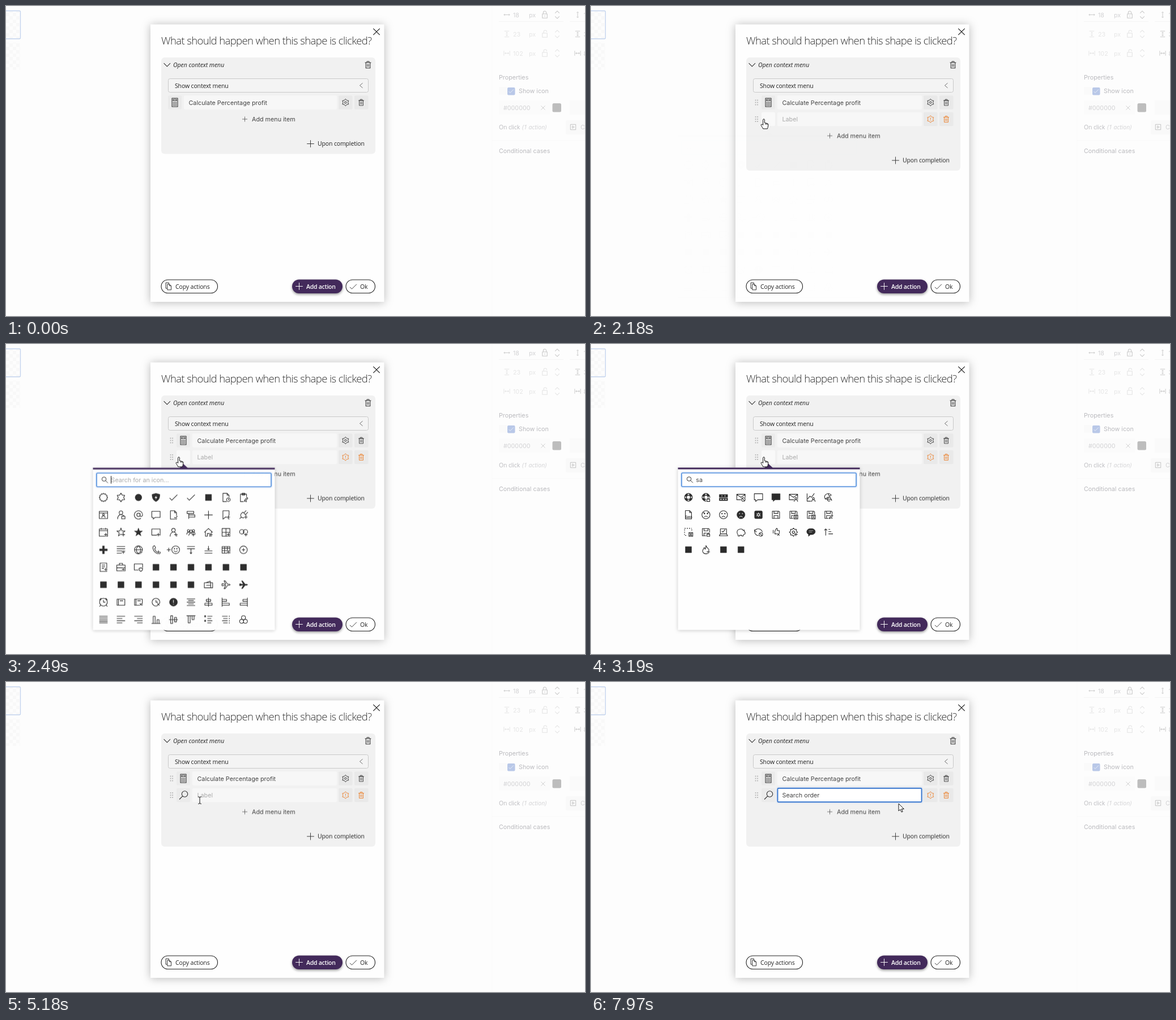
An HTML page that plays this animation: 1022 by 548 pixels, repeating every 8 s.

```html
<!DOCTYPE html>
<html lang="en">
<head>
<meta charset="utf-8">
<title>Context menu editor</title>
<style>
html, body { margin: 0; width: 100%; height: 100%; overflow: hidden; background: #fdfdfd; }
svg { display: block; }
text { font: 10.75px Inter, sans-serif; fill: #444; white-space: pre; }
.ui { font: 10.5px "Open Sans", sans-serif; letter-spacing: -.14px; fill: #222; }
.title { font: 300 18.5px "Open Sans", sans-serif; letter-spacing: -.61px; fill: #2c2c2c; }
.it { font-style: italic; letter-spacing: 0; }
.bold { font-weight: 600; letter-spacing: -.25px; fill: #fff; }
.hint { fill: #aaa; }
.dim { fill: #bababe; }
.pale { fill: #d2d2d4; }
.paler { fill: #e6e6e6; }
.sass { font-size: 5.5px; font-weight: 600; fill: #222; }
.i { fill: none; stroke: currentColor; stroke-width: 1.1; stroke-linejoin: round; }
.solid { fill: currentColor; fill-rule: evenodd; stroke-width: .6; }
.halo { fill: #fff; stroke: #fff; stroke-width: 2.8; }
.modal { filter: drop-shadow(0 1px 8px rgba(0, 0, 0, .27)); }
.raised { filter: drop-shadow(0 2px 2px rgba(0, 0, 0, .4)); }
.pop { filter: drop-shadow(0 1px 3px rgba(0, 0, 0, .2)); }
.focus { fill: #fff; stroke: #2f70cc; stroke-width: 1.7; filter: drop-shadow(0 0 1.5px rgba(60, 130, 230, .5)); }
.search { stroke: #5a94de; }
</style>
</head>
<body>
<svg id="stage" width="1022" height="548" viewBox="0 0 1022 548"></svg>
<script>
const LOOP = 8000, BLINK = 530, PURPLE = '#432a5b', ORANGE = '#ec8433';

// Timeline helpers
let css = '', count = 0;
function anim(stops, ease = 'linear') {
  const name = 'k' + count++;
  const keys = stops.map(([t, rule]) => `${t / LOOP * 100}%{${rule}}`).join('');
  css += `@keyframes ${name}{${keys}}`;
  return `style="animation:${name} ${LOOP}ms ${ease} infinite"`;
}
const show = (body, ...spans) => {
  const stops = spans.flatMap(([a, b]) => [[a, 'opacity:1'], [b, 'opacity:0']]);
  return `<g ${anim([[0, 'opacity:0'], ...stops], 'step-end')}>${body}</g>`;
};

// Drawing helpers
const text = (x, y, s, cls = '') => `<text x="${x}" y="${y}" class="${cls}">${s}</text>`;
const rect = (x, y, w, h, fill, r = 0, extra = '') =>
  `<rect x="${x}" y="${y}" width="${w}" height="${h}" rx="${r}" fill="${fill}" ${extra}/>`;
const ring = (x, y, r) => `M${x - r} ${y}a${r} ${r} 0 1 0 ${2 * r} 0a${r} ${r} 0 1 0 ${-2 * r} 0z`;
const box = (x, y, w, h) => `M${x} ${y}h${w}v${h}h${-w}z`;
const star = (n, R, r) => 'M' + Array.from({length: 2 * n}, (_, i) => {
  const a = i * Math.PI / n, q = i % 2 ? r : R;
  return (q * Math.sin(a)).toFixed(1) + ' ' + (-q * Math.cos(a)).toFixed(1);
}).join('L') + 'z';

const person = ring(0, -4, 3.2) + 'M-6 7.5c0-11 12-11 12 0';
const doc = 'M-5.5-7.5H2L5.5-4V7.5h-11zM2-7.5V-4h3.5';
const disk = 'M-6.5-6.5H5L6.5-5V6.5h-13zM-3.5-6.5v4h7v-4M-3.5 6.5V1.5h7v5';
const bubble = 'M-7.5-6.5h15v11h-9l-3.5 3v-3h-2.5z';
const face = ring(0, 0, 7.3) + ring(-2.6, -2, .6) + ring(2.6, -2, .6);
const clock = ring(0, 0, 7) + 'M0-4V0h3.5';
const cog = star(6, 7.2, 5);

const GLYPHS = {
  burst: star(12, 7.6, 6.2), hex: star(6, 7.8, 4.8), star: star(5, 7.8, 3.2), dot: ring(0, 0, 6), sq: box(-5.5, -5.5, 11, 11),
  shield: 'M0-7.5l7 2c0 7-2 10.5-7 13-5-2.5-7-6-7-13zM1-4l-4 5h2.5L-1 4.5 3-1H.5z',
  check: 'M-7 1l4 4L7-5', doc, clip: box(-5.5, -6, 11, 13.5) + box(-2.5, -7.5, 5, 3), person, bubble, disk, clock,
  book: box(-7, -5.5, 14, 11) + 'M-4.5-5.5v11M-2-2.5h6', folder: 'M-7.5-6h5l1.5 2h8.5v10h-15z',
  plane: 'M-7.5-1.2L-6-2l3 1h2.5L-3.5-7h2L3-1h3q3 1 0 2H3l-4.5 6h-2L-.5 1H-3l-3 1-1.5-.8.8-1.2z',
  card: box(-7.5, -6.5, 15, 13) + 'M-7.5-3.5h15' + ring(0, -.5, 1.6) + 'M-3 5c0-4.5 6-4.5 6 0',
  at: ring(0, 0, 3) + 'M3-3v4c0 3 4.5 2 4.5-1a7.5 7.5 0 1 0-3 6', sign: box(-7, -6.5, 12, 4) + box(-4, 0, 11, 4) + 'M-4-2.5V7',
  plus: 'M-7.5 0h15M0-7.5v15', mark: 'M-5.5-7.5h11v15L0 3.5l-5.5 4z',
  plug: 'M-7 7l3-3M1-4l4-4M4-1l4-4M-4 4c-3-4 0-7 3-9l6 6c-2 3-5 6-9 3z',
  cal: box(-7.5, -6, 15, 13) + 'M-7.5-3h15M-4-8v3M4-8v3', pane: box(-7.5, -6, 15, 11),
  group: ring(-4.5, -3, 2) + ring(4.5, -3, 2) + ring(0, -2, 2.2) + 'M-7.5 4c0-5 4-5 5-3M7.5 4c0-5-4-5-5-3M-4 6c0-6 8-6 8 0',
  home: 'M-7.5 0L0-7l7.5 7M-5.5-1.5V7h3.5V2h4v5h3.5v-8.5', grid: box(-7, -7, 14, 14) + 'M0-7V7M-7 0H7',
  link: ring(-3, -1, 4) + ring(3.5, -1, 4), bold: 'M-1.7-7h3.4v5.3H7v3.4H1.7V7h-3.4V1.7H-7v-3.4h5.3z',
  text: 'M-7.5-6h15M-7.5-2h15M-7.5 2h15M-7.5 6h9', globe: ring(0, 0, 7.2) + 'M-7 0H7M0-7c-5 4-5 10 0 14M0-7c5 4 5 10 0 14',
  phone: 'M-5-6.5l2.5-1 2 4-2 1.5C-1.5 1 0 3 2.5 4.5L4 2.5l4 2-1 2.5C-1 8-7 0-5-6.5z',
  smile: ring(4, 0, 7) + 'M.5 1.5q3.5 4 7 0' + ring(1.8, -2, .6) + ring(6.2, -2, .6) + 'M-12 0h7M-8.5-3.5v7',
  above: 'M-7-6H7M-7-2H7M0-2v9M-2 5l2 2 2-2', below: 'M-7 6H7M-7 2H7M0 0v-7M-2-2l2 2 2-2',
  table: box(-7, -6, 14, 12) + 'M-7-3H7M-7 1.5H7M-2.5-6V6M2.5-6V6', circ: ring(0, 0, 6.8) + 'M-3 0h6M0-3v6',
  page: box(-6, -7.5, 12, 15) + 'M-3-4h6M-3-1h6M-3 2h4', bag: box(-7.5, -4, 15, 10.5) + 'M-3-4v-3h6v3M-7.5 1h15',
  ticket: box(-7.5, -3.5, 15, 9) + 'M-5-3.5l8-3 1 3M-4 1h8M4-3.5v9', alarm: clock + 'M-7-4l3-3.5M7-4L4-7.5M-5 5l-2 3M5 5l2 3',
  alert: ring(0, 0, 7.2) + box(-.8, -4.5, 1.6, 6) + box(-.8, 3, 1.6, 1.6),
  mid: 'M-7.5-6h15M-5-3h10M-7.5 0h15M-5 3h10M-7.5 6h15', objC: 'M0-8V8' + box(-4, -5, 8, 3.5) + box(-6.5, 2, 13, 3.5),
  objL: 'M-7-8V8' + box(-7, -5, 8, 3.5) + box(-7, 2, 13, 3.5), objR: 'M7-8V8' + box(-1, -5, 8, 3.5) + box(-6, 2, 13, 3.5),
  full: 'M-7.5-6h15M-7.5-3h15M-7.5 0h15M-7.5 3h15M-7.5 6h15', left: 'M-7.5-6h15M-7.5-2h10M-7.5 2h15M-7.5 6h10',
  right: 'M-7.5-6h15M-2.5-2h10M-7.5 2h15M-2.5 6h10', bot: 'M-8 7H8' + box(-5, -6, 3.5, 13) + box(2, 0, 3.5, 7),
  cen: 'M-8 0H8' + box(-5, -7, 3.5, 14) + box(2, -4, 3.5, 8), top: 'M-8-7H8' + box(-5, -7, 3.5, 13) + box(2, -7, 3.5, 7),
  list: 'M-2-6H7M-2-2H5M-2 2H7M-2 6H5' + box(-7, -7, 2, 2) + box(-7, 1, 2, 2), listR: 'M-7-6H3M-5-2H3M-7 2H3M-5 6H3M6-7v2M6-3v2M6 1v2M6 5v2',
  coins: ring(0, -3.5, 3.6) + ring(-3.5, 3, 3.6) + ring(3.5, 3, 3.6),
  buoy: ring(0, 0, 7.3) + ring(0, 0, 3.3) + box(-1.8, -6.5, 3.6, 2.4) + box(-1.8, 4.1, 3.6, 2.4) + box(-6.5, -1.8, 2.4, 3.6) + box(4.1, -1.8, 2.4, 3.6),
  gift: box(-7.5, -5, 15, 5) + box(-7.5, 1.3, 15, 4.7) + box(-3.5, -4, 1.5, 3) + box(2, -4, 1.5, 3) + box(-6, 2.5, 3, 2.3) + box(-1.5, 2.5, 3, 2.3) + box(3, 2.5, 3, 2.3),
  mail: box(-7.5, -5.5, 15, 10) + 'M-7.5-5L0 0l7.5-5', chart: 'M-7-7V7H7M-6 3l4-5 3 2 5-7', chute: 'M-6 3C-10-5 0-10 5-4L-6 3l12 1M-1-7L6 6M2 1a3 3 0 1 0 1 5',
  glum: face + 'M-3 4q3-3 6 0M-5-4l3 1M5-4L2-3', sad: face + 'M-3 4.5q3-4 6 0',
  frown: ring(0, 0, 7.3) + ring(-2.6, -2, 1.1) + ring(2.6, -2, 1.1) + 'M-3.5 4.5q3.5-5 7 0l-1 .5q-2.5-3-5 0z',
  flower: 'M-5-7H5q2 0 2 2V5q0 2-2 2H-5q-2 0-2-2V-5q0-2 2-2z' + star(6, 5.2, 2.4) + ring(0, 0, 1.2),
  dash: 'M-7-7h2M-3-7h2M1-7h2M5-7h1M-7-5v2M-7-1v2M-7 3v2M-6 6h2M6-5v2', laptop: box(-5.5, -6, 11, 9) + 'M-7.5 6.5h15L5.5 3h-11zM-3-2l2 2 4-5',
  pig: 'M-7 0c0-7 10-7 11-3l2-1v3l1.5 1v3L5 4l-1 3H1.5V5.5h-4V7H-5L-5.5 4C-7 3-7 2-7 0z', sync: 'M-7-5v4h4M-7-1C-5-8 5-8 7 0M7 5V1H3M7 1C5 8-5 8-7 0',
  thumb: 'M-5-4V2M-2 3V-2L1-7c3 0 1 4 1 4h4v6z', cog: star(8, 7.4, 5.4) + ring(0, 0, 2.2), gear: cog + ring(0, 0, 2),
  chat: 'M-1-6.5h2c9 0 9 11 0 11H-1l-3.5 3v-3.7c-5.5-2.6-3.5-10.3 3.5-10.3z' + box(-4, -3.4, 8, 1.1) + box(-4, -.8, 6, 1.1),
  sort: 'M-5 6V-6M-7.5-3.5L-5-6l2.5 2.5M0-5h3M0-1h5M0 3h8', flame: 'M0-7.5c1 5 6 5 6 10a6 5 0 0 1-12 0c0-3 2-3 2.5-6 2 0 2 2 2 3 1-2 2-4 1.5-7z',
  cloud: 'M-4 4a3.5 3.5 0 0 1-.5-7C-3-8 4-7 4.5-3c4 0 4 7 0 7z', branch: ring(-4.5, -5, 2) + ring(-4.5, 5, 2) + ring(4, -3, 2) + 'M-4.5-3v6M-4.5 2Q3 2 4-1',
  bust: ring(0, -5, 2.3) + 'M-2.5 3V-1q2.5-3 5 0v4M-6 3.5h12v4H-6z', lens: ring(2, -2, 5.2) + 'M-1.7 1.7L-7.5 7.5',
  db: 'M-5-5c0-3 10-3 10 0V5c0 3-10 3-10 0zM-5-5c0 3 10 3 10 0', stack: box(-7.5, -7, 12, 9) + 'M-5.5 2v2.5h12.5v-9H4.5',
  film: box(-7.5, -6, 15, 12) + 'M-5-6V6M5-6V6', news: box(-7, -6, 14, 12) + box(-5, -3, 5, 4) + 'M-7-4.5H7M2-2h3M2 0h3M-5 3h8', photo: box(-7.5, -6, 15, 12) + 'M-7.5 3l4.5-5 4 4 3-3 3.5 3',
  calc: box(-5, -7.5, 10, 15) + box(-3, -5.5, 6, 2.5) + [-2.5, 0, 2.5].map(x => [0, 2.5, 5].map(y => box(x - .3, y - .3, .6, .6)).join('')).join(''),
  trash: box(-4, -4, 8, 10.2) + 'M-5.7-4H5.7M-2-4v-2.2h4V-4M-1.3-1.5V4M1.3-1.5V4', warn: cog + 'M0-3V1M0 2.2v1.2',
  copy: 'M-2.5-4h4L5-1v8h-7.5zM-2.5 4h-3v-11H.5V-4M1.5-4v3H5', cross: 'M-6-6L6 6M6-6L-6 6', down: 'M-6-3L0 3l6-6', back: 'M3-5l-6 5 6 5',
  lock: box(-4.5, -1.5, 9, 7.5) + 'M-2.8-1.5V-4a2.8 2.8 0 0 1 5.6 0v2.5M0 1.3v2', open: box(-4.5, -1.5, 9, 7.5) + 'M-2-1.5V-4a2.8 2.8 0 0 1 5.6 0',
  spin: 'M-4-3l4-4 4 4M-4 3l4 4 4-4', wide: 'M-6 0H6M-4-2l-2 2 2 2M4-2l2 2-2 2', tall: 'M0-6V6M-2-4l2-2 2 2M-2 4l2 2 2-2',
  inset: 'M-6-5v10M6-5v10M-4 0h8M-2-2l-2 2 2 2M2-2l2 2-2 2', span: 'M-5-6h10M-5 6h10M0-4v8M-2-2l2-2 2 2M-2 2l2 2 2-2',
  play: box(-5.5, -5.5, 11, 11) + 'M-1.5-2.5L2.5 0l-4 2.5z'
};
const BADGES = {
  plus: 'M-3 0h6M0-3v6', pen: 'M-3 3l1-2.5L2-4l1.5 1.5L-.5 2z', clock: ring(0, 0, 3.3) + 'M0-2V0h1.5', check: 'M-3 0l2 2 4-4',
  man: ring(0, -1.6, 1.8) + 'M-3.2 4c0-5 6.4-5 6.4 0', lock: box(-2.5, -.5, 5, 4) + 'M-1.5-.5v-2h3v2', ban: ring(0, 0, 3.2) + 'M-2.2-2.2l4.4 4.4',
  x: 'M-2-2l4 4M2-2l-4 4', lens: ring(.5, -.2, 2.6) + 'M-1.4 1.7L-3.8 4', case: box(-3, -1.5, 6, 4.5) + 'M-1-1.5V-3h2v1.5',
  shield: 'M0-3l3.3 1c0 3-1 4.5-3.3 5.5C-2.3 2.5-3.3 1-3.3-2z', disk: box(-3.5, -3.5, 7, 7) + 'M-1.5-3.5v2.5h3v-2.5M-1.5 3.5V1h3v2.5', q: 'M-1.2-1q0-2 1.5-1.7t1 2L0 1.5M0 3v.8'
};

// Codes read "shape", "#shape" for solid, "shape+badge" for a small mark
function icon(code, x, y, size = 1, color = '#333') {
  const [, solid, name, badge] = code.match(/(#?)(\w+)\+?(\w*)/);
  const mark = badge && `<g transform="translate(4.3 4)"><path class="i halo" d="${BADGES[badge]}"/><path class="i" d="${BADGES[badge]}"/></g>`;
  return `<g transform="translate(${x} ${y}) scale(${size})" color="${color}"><path class="i ${solid && 'solid'}" d="${GLYPHS[name]}"/>${mark}</g>`;
}
const gridOf = codes => codes.trim().split(/\s+/).map((code, i) =>
  icon(code, 172 + i % 9 * 30.9, 271 + Math.floor(i / 9) * 30.85, .98, '#2b2b2b')).join('');

const ALL = gridOf(`
  burst hex #dot #shield check check #sq doc+clock clip+pen
  card person+case at bubble doc+check sign plus mark+plus plug+plus
  cal+plus star+plus #star pane+plus person+plus group+plus home+plus grid+plus link+plus
  #bold text+plus globe+plus phone+plus smile above below table+plus circ
  page+plus bag+plus pane+shield #sq #sq #sq #sq #sq #sq
  #sq #sq #sq #sq #sq #sq ticket plane #plane
  alarm book book+x clock+x #alert mid objC objL objR
  full left right bot cen top list listR coins`);
const SA = gridOf(`
  #buoy #buoy+lock #gift mail+ban bubble #bubble mail+man chart+man chute
  doc glum sad #frown #flower disk disk+disk disk+disk disk+pen
  dash+disk disk+lock laptop pig sync+ban thumb+x cog+plus #chat sort
  #sq flame+plus #sq #sq`) + text(166, 308, 'Sass', 'sass');
const FOUND = gridOf(`
  cloud+lens branch+lens doc+lens bust person+q person+q db+lens cal+lens mark+lens
  stack+lens lens folder+lens person+lens folder+lens film+lens news+lens photo+lens`);

const pen = document.createElement('canvas').getContext('2d');
pen.font = '10.75px Inter, sans-serif';
const caret = (x, y, ...spans) => show(rect(x, y - 7, 1, 13.5, '#111'), ...spans);
function typed(x, y, steps, end) {
  return steps.map(([t, s], i) => {
    const to = i + 1 < steps.length ? steps[i + 1][0] : end;
    return show(text(x, y + 4, s), [t, to]) +
      caret(x + pen.measureText(s).width, y, [t, Math.min(t + BLINK, to)]);
  }).join('');
}

function backdrop() {
  const sizeRow = (y, mark, value, lock, cls, color, mark2, value2) => icon(mark, 884, y, .85, color) +
    text(895, y + 4, value, cls) + text(923, y + 4, 'px', cls) +
    icon(lock, 951, y, .95, color) + icon('spin', 973, y, .95, color) +
    icon(mark2, 1009, y, .85, '#c8c8c8') + text(1019.5, y + 4, value2, 'pale');
  const thumb = (y, h) => rect(-8, y, 33, h, 'url(#checks)');
  return `<pattern id="checks" width="12" height="12" patternUnits="userSpaceOnUse">
      <rect width="12" height="12" fill="#fdfdfd"/><path d="M0 0h6v12h6v-6H0z" fill="#f8f8f8"/></pattern>` +
    thumb(8, 50) + rect(-8, 8.5, 33.5, 49.5, 'none', 2, 'stroke="#c3d3ee" stroke-width="1.3"') + thumb(65, 48) +
    rect(857, 0, 165, 548, '#fdfdfd') + rect(857, 0, 1, 548, '#fafafa') + rect(858, 237, 164, 1, '#f9f9f9') +
    rect(870, 27, 114, 1, '#f5f5f5') + rect(995, 27, 27, 1, '#f5f5f5') +
    sizeRow(15.5, 'wide', '18', 'lock', 'pale', '#c8c8c8', 'tall', '1') +
    sizeRow(49.5, 'span', '23', 'open', 'paler', '#e4e4e4', 'span', '3') +
    sizeRow(83.5, 'inset', '102', 'open', 'paler', '#e4e4e4', 'inset', '8') +
    text(870, 129.5, 'Properties', 'dim') + rect(870, 143, 14, 14, '#fafafa') +
    rect(885, 144, 13.5, 13.5, '#b9c8e8', 2) + icon('check', 891.7, 150.5, .6, '#fff') +
    text(905, 154.3, 'Show icon', 'dim') + rect(870, 167, 90, 25, '#fbfbfb') +
    text(878, 184, '#000000', 'pale') + icon('cross', 948, 180, .6, '#bbb') +
    rect(964.5, 172, 15.5, 15.5, '#bdbdbd', 2.5) + rect(995, 167, 27, 25, '#fafafa') +
    text(870, 218, 'On click', 'ui dim') + text(911, 218, '(1 action)', 'ui it pale') +
    rect(988, 202, 34, 25, '#f9f9f9', 2) + icon('play', 1001, 214, .85, '#c0c0c0') +
    text(1014, 218, 'C', 'pale') + text(870, 260.3, 'Conditional cases', 'dim');
}

function menuRow(y, left, body, mark, gear, color) {
  const field = left + 28;
  return rect(left, y - 12.3, 24, 24.6, '#ebebeb', 2) + (mark && icon(mark, left + 12, y)) +
    rect(field, y - 12.3, 584 - field, 24.6, '#f7f7f7', 2) + text(field + 8.5, y + 4, body, color ? 'hint' : '') +
    rect(587, y - 12.3, 24.5, 24.6, '#e9e9e9', 2) + rect(615, y - 12.3, 24.5, 24.6, '#e9e9e9', 2) +
    icon(gear, 599.3, y, .87, color || '#333') + icon('trash', 627, y, .87, color || '#444');
}
const grip = y => [-4, 0, 4].map(dy => rect(289.7, y + dy - .8, 1.7, 1.7, '#aaa') + rect(293.2, y + dy - .8, 1.7, 1.7, '#aaa')).join('');

function dialog() {
  const pill = 'stroke="#222" stroke-width="1.1"';
  const foot = `<g ${anim([[0, 'transform:translateY(0)'], [1340, 'transform:translateY(29.4px)']], 'step-end')}>` +
    icon('plus', 421.5, 200, .6) + text(434, 204, 'Add menu item') +
    icon('plus', 537.5, 243.5, .85) + text(550, 247, 'Upon completion', 'ui') + '</g>';
  return rect(255, 32.5, 412.5, 490.5, '#fefefe', 0, 'class="modal"') +
    text(274, 68.3, 'What should happen when this shape is clicked?', 'title') + icon('cross', 654, 45.5, .95, '#111') +
    rect(274, 91, 378, 170.5, '#f1f1f1', 6) + show(rect(274, 200, 378, 91, '#f1f1f1', 6), [1340, LOOP]) +
    icon('down', 284.3, 104, .95) + text(295, 107.7, 'Open context menu', 'ui it') + icon('trash', 639, 103.8, .95) +
    rect(286.5, 128.5, 353, 24, '#f4f4f4', 3, 'stroke="#c9c9c9"') +
    text(298, 144.5, 'Show context menu', 'ui') + icon('back', 627, 140.5, .85, '#666') +
    show(menuRow(170.5, 286, 'Calculate Percentage profit', 'calc', 'gear'), [0, 1340]) +
    show(grip(170.5) + menuRow(170.5, 301, 'Calculate Percentage profit', 'calc', 'gear') +
      grip(200) + menuRow(200, 301, 'Label', '', 'warn', ORANGE), [1340, LOOP]) +
    show(rect(301, 187.7, 24, 24.6, '#f9f9f9', 2), [1870, 4170]) +
    show(icon('lens', 313.5, 200), [4720, LOOP]) +
    show(rect(329.5, 187.8, 254, 24.4, '#fff', 1.5, 'class="focus"'), [1340, 2100], [5350, LOOP]) +
    show(text(337.5, 204, 'Label', 'hint'), [1340, 2100], [5350, 6110]) +
    caret(337, 200, [1340, 1870], [5350, 5880]) +
    typed(337.5, 200, [[6110, 'S'], [6260, 'Se'], [6330, 'Sea'], [6410, 'Sear'], [6580, 'Searc'], [6660, 'Search'],
      [6730, 'Search '], [6810, 'Search o'], [6960, 'Search or'], [7040, 'Search ord'], [7260, 'Search order']], LOOP) +
    foot +
    rect(274, 484, 99.5, 23.5, '#fff', 11.75, pill) + icon('copy', 287, 495.5, .9) + text(299, 499.5, 'Copy actions', 'ui') +
    rect(505, 483.5, 89, 24.5, PURPLE, 12.25, 'class="raised"') + icon('plus', 517.5, 495.5, .85, '#fff') + text(530, 499.5, 'Add action', 'ui bold') +
    rect(600, 484, 51.5, 23.5, '#fff', 11.75, pill) + icon('check', 613, 496, .85) + text(625, 499.5, 'Ok', 'ui');
}

function picker() {
  const pose = (o, y) => `opacity:${o};transform:translateY(${y}px)`;
  const move = anim([[0, pose(0, 10)], [2180, pose(0, 10)], [2340, pose(.74, 5)], [2500, pose(1, 0)],
    [4720, pose(1, 0)], [5020, pose(0, 10)], [LOOP, pose(0, 10)]]);
  const hover = (x, a, b) => show(rect(x - 12, 290, 24, 24, '#e9e9e9', 2), [a, b]);
  return `<g ${move}>` + rect(153.5, 218.5, 321, 287, '#fefefe', 1, 'class="pop"') +
    rect(153.5, 218.5, 321, 3, PURPLE) + `<path d="M306 219l7.5-7 7.5 7z" fill="${PURPLE}"/>` +
    rect(160, 228, 308, 24, '#fff', 1.5, 'class="focus search"') +
    `<g transform="translate(174.5 240) scale(-.72 .72)"><path class="i" d="${GLYPHS.lens}"/></g>` +
    show(text(185.5, 244, 'Search for an icon...', 'hint'), [0, 2570]) + caret(185, 240, [2180, 2570]) +
    typed(185.3, 240, [[2570, 's'], [2650, 'sa'], [3490, 'se'], [3570, 'sea'], [3640, 'sear'], [3870, 'searc']], LOOP) +
    hover(265, 4330, 4450) + hover(203, 4450, 4720) +
    show(ALL, [0, 2570], [3490, 3570]) + show(SA, [2570, 3490]) + show(FOUND, [3570, LOOP]) + '</g>';
}

function pointer() {
  const path = [[0, 928, 520], [70, 928, 520], [290, 600, 300], [510, 472, 198], [1400, 472, 198], [1650, 400, 199],
    [1950, 305, 200], [4080, 305, 200], [4170, 320, 240], [4250, 300, 318], [4330, 262, 307], [4410, 219, 299],
    [4490, 201, 301], [4740, 201, 301], [5100, 330, 215], [5350, 367, 196], [7630, 367, 196], [7720, 470, 150],
    [7820, 658, 127], [7900, 610, 165], [7970, 543, 215], [LOOP, 543, 215]];
  const move = anim(path.map(([t, x, y]) => [t, `transform:translate(${x}px,${y}px)`]));
  const shape = d => `<path d="${d}" fill="#fff" stroke="#111" stroke-linejoin="round"/>`;
  const arrow = shape('M0 0v13l3-2.7 2.2 4.7 2-.9L5.1 9.5h4.3z');
  const hand = shape('M-1.4 10V1.3a1.4 1.4 0 0 1 2.8 0V6.5l5 1.2q1.8.5 1.6 2.3l-.8 4.2q-.3 1.2-.8 2.8H-1.2Q-2.5 14.5-4.6 11.3q-.9-1.8.8-2.2 1.3 0 2.4 1.6zM3.6 7v2.8M6 7.7v2.5');
  const beam = '<path d="M-2.8-6Q0-6 0-4.5V5Q0 6.5-2.8 6.5M2.8-6Q0-6 0-4.5M0 5q0 1.5 2.8 1.5" fill="none" stroke="#111"/>';
  return `<g ${move}>` + show(arrow, [70, 480], [4170, 5100], [7680, LOOP]) +
    show(hand, [480, 1340], [1870, 4170]) + show(beam, [1340, 1870], [5100, 7680]) + '</g>';
}

const scene = backdrop() + dialog() + picker() + pointer();
document.head.appendChild(document.createElement('style')).textContent = css;
document.getElementById('stage').innerHTML = scene;
</script>
</body>
</html>
```
